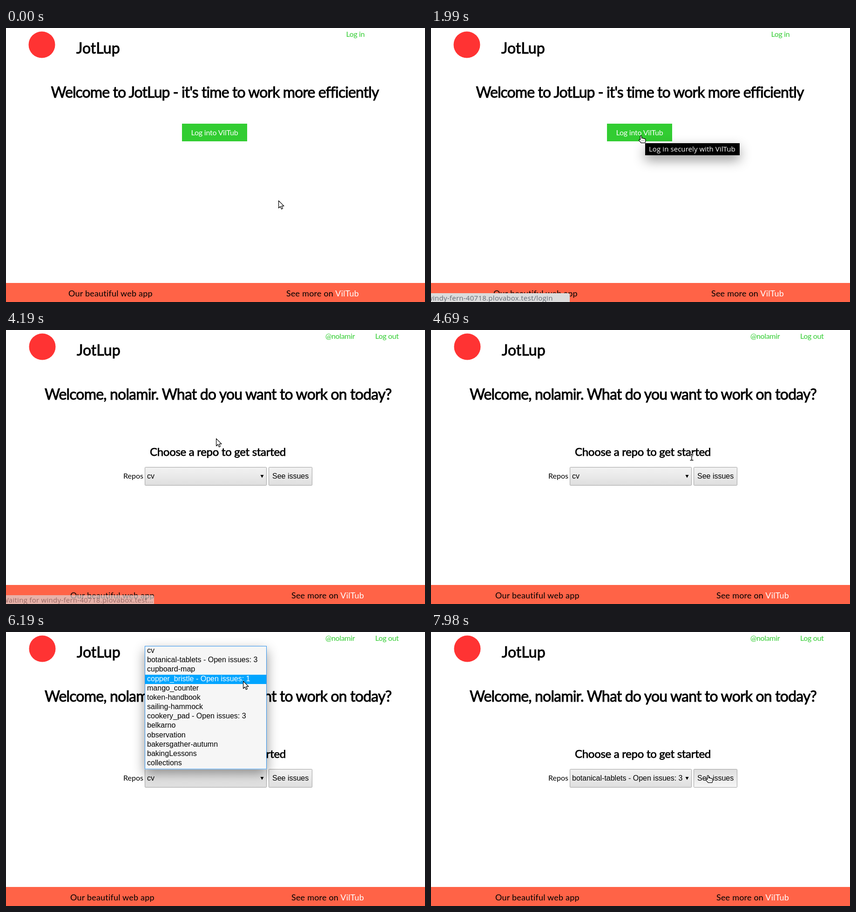
These frames come from a looping animation (900 by 590 pixels, 8000 ms). An HTML page:

```html
<!DOCTYPE html>
<html lang="en">
<head>
<meta charset="utf-8">
<title>JotLup</title>
<style>
  html, body { margin: 0; width: 100%; height: 100%; overflow: hidden; background: #fff; }
  svg { display: block; width: 900px; height: 590px; }
  text { font-family: Lato, sans-serif; font-size: 16px; }
  .head { font-size: 32px; stroke: #000; stroke-width: .95px; }
  .big { letter-spacing: -.83px; text-anchor: middle; }
  .tight { letter-spacing: -.92px; }
  .sub { font-size: 24px; stroke-width: .75px; letter-spacing: -.3px; text-anchor: middle; }
  .foot { font-size: 18px; letter-spacing: .2px; }
  .link { fill: #32cd32; letter-spacing: -.35px; }
  .ui { font-family: "Liberation Sans", Arial, sans-serif; }
  .tip { font-family: "Open Sans", sans-serif; font-size: 15px; font-weight: 500; letter-spacing: .08px; fill: #fff; }
  .stat { font-family: "Open Sans", sans-serif; font-size: 15px; letter-spacing: .27px; fill: #646b74; }
  .shade { filter: drop-shadow(0 10px 13px rgba(0, 0, 0, .42)); }
</style>
</head>
<body>
<svg viewBox="0 0 900 590" xmlns="http://www.w3.org/2000/svg">
  <defs>
    <linearGradient id="up" x2="0" y2="1">
      <stop stop-color="#f1f1f1"/><stop offset=".38" stop-color="#ececec"/><stop offset="1" stop-color="#dedede"/>
    </linearGradient>
    <linearGradient id="lit" x2="0" y2="1">
      <stop stop-color="#f4f4f4"/><stop offset=".38" stop-color="#f0f0f0"/><stop offset="1" stop-color="#e3e3e3"/>
    </linearGradient>
    <linearGradient id="down" x2="0" y2="1">
      <stop stop-color="#dedede"/><stop offset=".6" stop-color="#ededed"/><stop offset="1" stop-color="#f6f6f6"/>
    </linearGradient>
  </defs>
  <rect width="900" height="590" fill="#fff"/>

  <g id="frame">
    <circle id="logo" cy="36" r="28.5" fill="#f33"/>
    <text id="brand" class="head" y="55">JotLup</text>
    <rect y="549" width="900" height="41" fill="#ff6347"/>
    <text id="footL" class="foot" y="578">Our beautiful web app</text>
    <text id="footR" class="foot" y="578">See more on <tspan fill="#fff">VilTub</tspan></text>
  </g>

  <g id="welcome">
    <text class="link" x="730.5" y="19">Log in</text>
    <text class="head big tight" x="448.5" y="150">Welcome to JotLup - it's time to work more efficiently</text>
    <rect x="378" y="206" width="140" height="38" fill="#32cd32"/>
    <text x="448" y="231" fill="#fff" text-anchor="middle" letter-spacing="-.2">Log into VilTub</text>
  </g>

  <g id="home">
    <text class="link" x="686" y="19">@nolamir</text>
    <text class="link" x="793" y="19">Log out</text>
    <text class="head big" x="455.5" y="150">Welcome, nolamir. What do you want to work on today?</text>
    <text class="head sub" x="455" y="271">Choose a repo to get started</text>
    <text x="252" y="320">Repos</text>
    <rect x="298.5" y="295.5" width="261" height="39" rx="1" fill="url(#up)" stroke="#a2a2a2"/>
    <text id="choice" class="ui" x="303" y="320"></text>
    <path d="M546.5 312h7l-3.5 6.500z"/>
    <rect id="go" x="564.5" y="295.5" width="93" height="39" rx="1" stroke="#a2a2a2"/>
    <text class="ui" x="572" y="320">See issues</text>
    <g id="list">
      <rect class="shade" x="298" y="30" width="262" height="266" fill="#f6f6f6"/>
      <rect x="298.5" y="30.5" width="261" height="264.5" fill="#f6f6f6" stroke="#2f93ee"/>
      <rect id="mark" x="299" width="260" height="20" fill="#00a5ff"/>
      <g id="rows"></g>
    </g>
  </g>

  <g id="status">
    <path id="bubble" fill="#dcdcdc"/>
    <text id="note" class="stat" x="-8" y="587"></text>
  </g>

  <g id="tip">
    <rect class="shade" x="460" y="248" width="203" height="26"/>
    <text class="tip" x="468" y="266">Log in securely with VilTub</text>
  </g>

  <g id="cursor" stroke-linejoin="round">
    <path id="arrow" d="M.6 .9V16.7L4.3 13.3 6.7 18.9 9.3 17.8 7 12.3H12Z" fill="#fff" stroke="#000" stroke-width="1.2"/>
    <g id="hand" transform="translate(-4.700 -1)">
      <path d="M4.2 9.8V2.300a1.500 1.500 0 0 1 3 0V6.400c1-.8 2.400-.5 2.800.5 1-.6 2.200-.2 2.600.7 1.200-.5 2.900.1 2.900 1.600v3.800l-1 3.300H6L1.500 11.200c-.9-1.700 1.300-2.800 2.700-1.400z" fill="#fff" stroke="#000" stroke-width="1.200"/>
      <path d="M7.500 10.500v2.500M10 10.500v2.500M12.500 10.500v2.500" fill="none" stroke="#000" stroke-width=".8" stroke-dasharray="1 1"/>
    </g>
    <g id="beam" fill="none">
      <path d="M-3.5-6.5H3.5M-3.5 6.5H3.5M0-6.5V6.5" stroke="#fff" stroke-width="3.4"/>
      <path d="M-3.5-6.5H-1L0-5.5 1-6.5H3.5M-3.5 6.5H-1L0 5.5 1 6.5H3.5M0-5.5V5.5" stroke="#000" stroke-width="1.3"/>
    </g>
  </g>
</svg>
<script>
const LOOP = 8000;
const el = {};
document.querySelectorAll('svg [id]').forEach(n => el[n.id] = n);

const repos = [
  'cv', 'botanical-tablets - Open issues: 3', 'cupboard-map',
  'copper_bristle - Open issues: 1', 'mango_counter', 'token-handbook',
  'sailing-hammock', 'cookery_pad - Open issues: 3', 'belkarno',
  'observation', 'bakersgather-autumn', 'bakingLessons', 'collections'
];
const ROW = 20.17;
const rows = repos.map((name, i) => {
  const row = document.createElementNS('http://www.w3.org/2000/svg', 'text');
  row.setAttribute('class', 'ui');
  row.setAttribute('x', 303);
  row.setAttribute('y', Math.round(45 + i * ROW));
  row.textContent = name;
  el.rows.append(row);
  return row;
});

const site = 'windy-fern-40718.plovabox.test';
const notes = [
  [0, site + '/login'],
  [2620, 'Waiting for viltub.test…'],
  [2860, 'Establishing secure connection…'],
  [3000, 'Waiting for ' + site + '…']
];

const ease = {
  both: u => u * u * (3 - 2 * u),
  in: u => u ** 1.5,
  out: u => 1 - (1 - u) ** 1.6,
  line: u => u,
  jump: u => u < 1 ? 0 : 1
};
// time, x, y, easing into this point
const path = [
  [750, 585, 371], [1510, 450, 232, 'both'], [2040, 449, 232, 'jump'],
  [4150, 449, 232, 'jump'], [4620, 565, 268, 'both'], [4690, 560, 274, 'line'],
  [4930, 541, 319, 'out'], [5690, 541, 319, 'jump'], [6190, 509, 105, 'in'],
  [6510, 507, 55, 'out'], [6550, 507, 52, 'jump'], [7010, 507, 52, 'jump'],
  [7490, 594, 309, 'both']
];

const clamp = v => Math.max(0, Math.min(1, v));
const show = (node, on) => node.style.display = on ? '' : 'none';
const put = (node, name, value) => node.setAttribute(name, value);
const inside = ([x, y], l, t, r, b) => x >= l && x < r && y >= t && y < b;

function pointer(t) {
  const i = path.findIndex(k => k[0] > t);
  if (i === 0) return path[0].slice(1, 3);
  if (i < 0) return path[path.length - 1].slice(1, 3);
  const [a, b] = [path[i - 1], path[i]];
  const u = ease[b[3]]((t - a[0]) / (b[0] - a[0]));
  return [1, 2].map(j => Math.round(a[j] + (b[j] - a[j]) * u));
}

function cursorKind(p, first, home, open) {
  if (first) return inside(p, 378, 206, 518, 244) ? 'hand' : 'arrow';
  if (!home || open) return 'arrow';
  if (inside(p, 564, 295, 658, 335)) return 'hand';
  const onText = inside(p, 309, 248, 602, 278) || inside(p, 84, 122, 828, 158);
  return onText ? 'beam' : 'arrow';
}

function drawStatus(t) {
  const fade = t < 3000 ? clamp((t - 1590) / 120) : 1 - clamp((t - 4150) / 120);
  show(el.status, fade > 0);
  put(el.status, 'opacity', fade);
  const w = t < 3000 ? 298 : t < 3090 ? 308 : 318;
  put(el.bubble, 'd', `M0 571H${w - 4}q4 0 4 4V590H0z`);
  el.note.textContent = notes.filter(n => n[0] <= t).pop()[1];
}

function drawList(t, p) {
  const fade = t < 6810 ? clamp((t - 4990) / 300) : t < 6850 ? .45 : 0;
  show(el.list, fade > 0);
  put(el.list, 'opacity', fade);
  const entered = t > 5730 && p[1] < 293;
  const pick = entered ? Math.min(12, Math.max(0, Math.floor((p[1] - 31) / ROW))) : 0;
  put(el.mark, 'y', Math.round(31 + pick * ROW));
  rows.forEach((r, i) => put(r, 'fill', i === pick ? '#fff' : '#000'));
  el.choice.textContent = repos[t < 6810 ? 0 : 1];
}

function draw(t) {
  const first = t < 3330, home = t >= 3820;
  const p = pointer(t);
  show(el.frame, first || home);
  show(el.welcome, first);
  show(el.home, home);

  const dx = home ? 1 : 0;
  put(el.logo, 'cx', 77 + dx);
  put(el.brand, 'x', 151 + dx);
  put(el.footL, 'x', home ? 138 : 134);
  put(el.footR, 'x', home ? 613 : 602);

  const tip = t < 1990 ? 0 : t < 2040 ? 1 : t < 2090 ? .66 : t < 2140 ? .33 : 0;
  show(el.tip, tip > 0);
  put(el.tip, 'opacity', tip);

  drawStatus(t);
  drawList(t, p);

  const kind = cursorKind(p, first, home, t >= 5030 && t < 6850);
  const fill = t >= 7980 ? 'down' : kind === 'hand' ? 'lit' : 'up';
  put(el.go, 'fill', `url(#${fill})`);
  ['arrow', 'hand', 'beam'].forEach(k => show(el[k], k === kind));
  put(el.cursor, 'transform', `translate(${p})`);
}

function tick() {
  draw(performance.now() % LOOP);
  requestAnimationFrame(tick);
}
tick();
</script>
</body>
</html>
```
